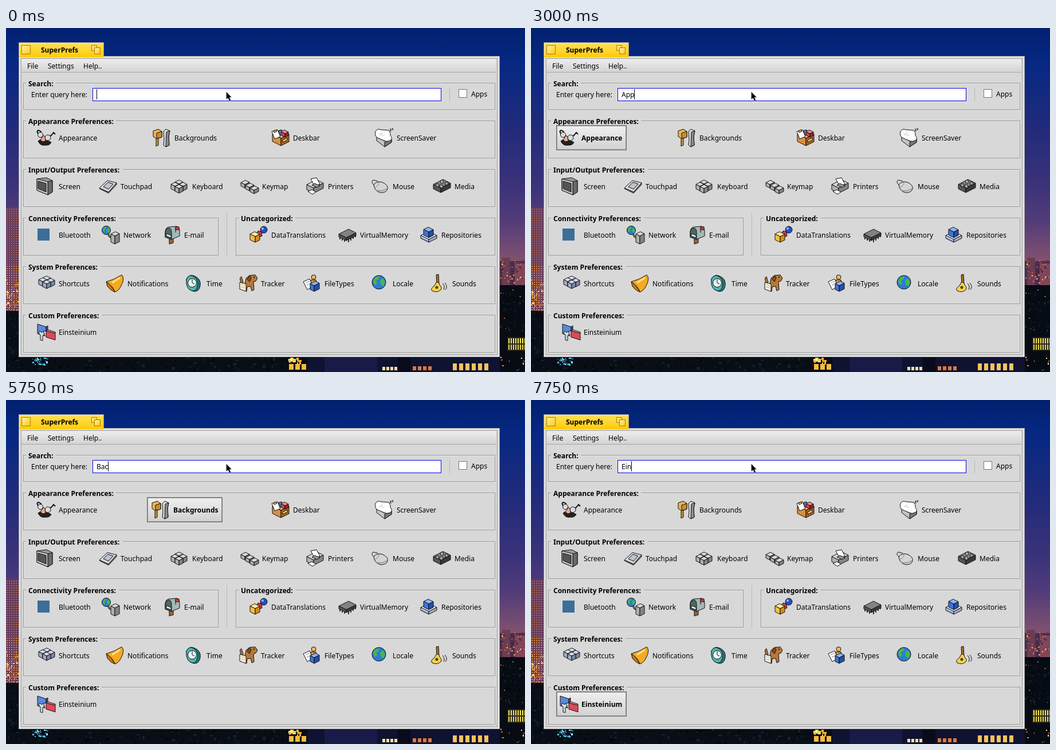
These frames come from a looping animation (906 by 602 pixels, 8000 ms). An HTML page:

```html
<!DOCTYPE html>
<html lang="en">
<head>
<meta charset="utf-8">
<title>SuperPrefs</title>
<style>
  html, body { margin: 0; width: 100%; height: 100%; overflow: hidden; background: #021f70; }
  svg { display: block; width: 100vw; height: 100vh; }
  text { font: 12px "Noto Sans", sans-serif; fill: #000; white-space: pre; }
  .bold { font-weight: bold; }
  rect, .crisp { shape-rendering: crispEdges; }
</style>
</head>
<body>
<svg viewBox="0 0 906 602">
  <defs>
    <linearGradient id="sky" x2="0" y2="1">
      <stop offset="0" stop-color="#02206f"/><stop offset=".1" stop-color="#062883"/>
      <stop offset=".3" stop-color="#232b7a"/><stop offset=".45" stop-color="#3a327a"/>
      <stop offset=".56" stop-color="#523c7a"/><stop offset=".67" stop-color="#80506f"/>
    </linearGradient>
    <linearGradient id="gold" x2="0" y2="1">
      <stop offset="0" stop-color="#ffe05a"/><stop offset="1" stop-color="#ffcb08"/>
    </linearGradient>
    <linearGradient id="goldBox" x2="1" y2="1">
      <stop offset="0" stop-color="#fff3a8"/><stop offset="1" stop-color="#ffc61a"/>
    </linearGradient>
    <linearGradient id="menu" x2="0" y2="1">
      <stop offset="0" stop-color="#ededed"/><stop offset="1" stop-color="#d2d2d2"/>
    </linearGradient>
    <linearGradient id="button" x2="0" y2="1">
      <stop offset="0" stop-color="#f0f0f0"/><stop offset="1" stop-color="#d0d0d0"/>
    </linearGradient>
  </defs>
  <g id="static"></g>
  <g id="items"></g>
  <g id="live"></g>
</svg>
<script>
const $ = id => document.getElementById(id);
const rect = (x, y, w, h, fill, stroke) => stroke
  ? `<rect x="${x + .5}" y="${y + .5}" width="${w - 1}" height="${h - 1}" fill="${fill}" stroke="${stroke}"/>`
  : `<rect x="${x}" y="${y}" width="${w}" height="${h}" fill="${fill}"/>`;
const text = (x, y, s, bold) => `<text x="${x}" y="${y}"${bold ? ' class="bold"' : ''}>${s}</text>`;
const path = (fill, d, extra = '') => `<path fill="${fill}" d="${d}" ${extra}/>`;
const line = (d, color = '#111', width = 1) => path('none', d, `style="stroke:${color};stroke-width:${width}"`);
const ball = (x, y, r, fill) => `<circle cx="${x}" cy="${y}" r="${r}" fill="${fill}"/>`;

// Isometric block; (x, y) is the front corner of its top face.
const block = (x, y, a, b, h, [top, left, right]) =>
  path(top, `M${x} ${y}l${-a} ${-a / 2} ${b} ${-b / 2} ${a} ${a / 2}z`) +
  path(left, `M${x} ${y}l${-a} ${-a / 2}v${h}l${a} ${a / 2}z`) +
  path(right, `M${x} ${y}l${b} ${-b / 2}v${h}l${-b} ${b / 2}z`);
const blocks = (spots, ...size) => spots.map(([x, y]) => block(x, y, ...size)).join('');

const GREY = ['#dadada', '#b0b0b0', '#858585'], PALE = ['#f2f4fa', '#d0d5e4', '#a5adc5'];
const DARK = ['#8a8a8a', '#555', '#3a3a3a'], BLUE = ['#8db4f5', '#3f74dc', '#2450a8'];
const YELLOW = ['#ffe9a0', '#f7bf3c', '#d48d18'], RED = ['#ff8c8c', '#e03c48', '#a8202c'];
const WOOD = ['#f2c07a', '#d98f3e', '#a86424'], STEEL = ['#d5dcea', '#a3adc4', '#7c88a6'];
const globe = (x, y, r) => ball(x, y, r, '#2f7ad8') +
  `<g transform="translate(${x} ${y}) scale(${r / 12})" stroke="none">` +
  path('#45b848', 'M-9-5q5-7 10-5l-2 5-4 2 2 4-3 4q-5-4-3-10zM3-5l5-1 3 6-3 7-4-2-2-5z') + '</g>';

const icons = {
  Appearance: line('M3 10Q-2 4 3 3l5 3M20 14l5-2 4-5 3 3', '#111', 2) + ball(6, 11, 4.5, '#d5dde0') +
    path('#222', 'M2 22q5-5 11-1 5-1 12 3-3 6-10 5-9 2-13-7z') + ball(19, 16, 5, '#d5dde0') +
    path('#f3a58c', 'M11 12l3 2 1 8-5 1-4-3z'),
  Backgrounds: path('#e8b456', 'M1 4l9-3 6 4v10l-9 3-6-4z') + path('#c98d38', 'M7 8l9-3v10l-9 3z') +
    path('#c98d38', 'M6 18l4-2v13l-4 2z') + path('#dcdcdc', 'M19 5l4-4 7 3-2 10 1 15-6 3-4-3 1-10z') +
    path('#8c8c8c', 'M24 6l6-2-2 10 1 15-6 3z'),
  Deskbar: block(17, 17, 15, 14, 13, WOOD) + path('#fff', 'M1 5l10-3 5 12-10 4z') +
    path('#f0b73a', 'M4 4l5-2 1 3-5 2z') + path('#5b8ae0', 'M13 4l5-2 2 8-5 2z') +
    block(24, 9, 7, 6, 6, RED) + path('#f5cf70', 'M20 20l8-4v4l-8 4z'),
  ScreenSaver: path('#c4c4c4', 'M3 14l14 8 12-4v6l-12 8-14-11z') + path('#777', 'M17 24l12-6v6l-12 8z') +
    path('#fff', 'M1 5q4-6 9-3l14 1q4 4 3 9 4 5 1 8-6 4-12 1L4 16Q-1 12 1 5z') +
    line('M7 8l2 4 3-5 1 6 4-3', '#ccc') + line('M26 1h3l-3 3h3M30 0h2l-2 2h2'),
  Screen: path('#9a9a9a', 'M0 3l17-2 10 5v20l-8 5-19-8z') + path('#6a6a6a', 'M19 8l8-2v20l-8 5z') +
    path('#c8c8c8', 'M0 3l19 5v23L0 23z') + path('#555', 'M2 7l14 4v15L2 20z'),
  Touchpad: path('#777', 'M1 20l16 8 14-15v-3z') + path('#d8d8d8', 'M1 19L15 6l16 4-14 16z') +
    path('#bac4d0', 'M8 17l8-8 9 3-8 9z'),
  Keyboard: blocks([[15, 12], [8, 16], [22, 16], [15, 20]], 7, 7, 8, GREY),
  Keymap: blocks([[8, 13], [16, 18], [24, 23]], 7, 8, 6, GREY),
  Printers: block(13, 19, 12, 17, 9, GREY) + path('#fff', 'M8 3l10-2 6 11-9 4z') +
    path('#999', 'M10 14l9 4 5-3-9-4z') + path('#fff', 'M3 25l7-3 7 4-6 4z'),
  Mouse: line('M6 14Q-1 9 4 5l8 2') + path('#d5d5d5', 'M5 13q6-7 15-4 11 5 9 12-3 7-13 6Q6 24 5 13z') +
    line('M14 9q0 7-8 9', '#888') + line('M8 22q9 5 20-2', '#999', 2),
  Media: block(14, 19, 13, 17, 8, DARK) + ball(8, 14, 3, '#999') + ball(15, 16, 3, '#aaa') +
    ball(16, 8, 3, '#aaa') + ball(24, 11, 3, '#999'),
  Bluetooth: `<rect x="1" y="5" width="21" height="21" fill="#3c6e98" stroke="none"/>`,
  Network: line('M11 13q2 9 9 7', '#111', 3) + line('M11 13q2 9 9 7', '#e6d36a') + globe(8, 8, 7.5) +
    block(23, 18, 7, 8, 14, GREY),
  'E-mail': path('#9a6432', 'M12 22l7-2v10l-7 2z') + path('#a4b8b6', 'M5 10q1-8 8-8l12-1q5 2 5 8v9l-14 6-11-4z') +
    path('#4e6664', 'M5 11q1-7 6-7t5 8v12L5 20z') + path('#fff', 'M7 14l8 3v4l-8-3z') +
    line('M23 12V3') + path('#e03c38', 'M23 2h6v5h-6z'),
  DataTranslations: line('M11 18l13-10', '#111', 3) + path('#d83840', 'M15 9l6 2 1 7-6 2-4-5z') +
    ball(25, 7, 6, '#2050c4') + `<circle cx="23" cy="5" r="2" fill="#9bbcff" stroke="none"/>` +
    block(10, 19, 9, 8, 10, YELLOW),
  VirtualMemory: line('M3 18v6M7 20v6M11 22v6M18 23v6M22 20v6M26 17v6M30 14v6', '#333', 2) +
    block(14, 21, 13, 17, 5, ['#828282', '#555', '#3c3c3c']),
  Repositories: block(16, 24, 14, 14, 5, PALE) + block(16, 11, 9, 8, 10, BLUE) + line('M3 21l12 6', '#3f74dc'),
  Shortcuts: blocks([[17, 10], [10, 13], [24, 14], [17, 17]], 7, 7, 8, STEEL),
  Notifications: path('#f4aa22', 'M1 13q13-3 27-12 6 6-1 19-4 9-11 11-3-10-15-18z') +
    path('#c97a10', 'M1 13q10 7 15 18-7-2-13-10z') + line('M11 15l14-9', '#ffe08a', 3),
  Time: path('#267878', 'M3 8q5-9 14-5 12 5 10 17-2 11-11 10Q2 27 3 8z') +
    path('#50b4b4', 'M3 8q5-9 13-4 9 6 6 17-2 9-9 8Q1 26 3 8z') + ball(13, 15, 7.5, '#e8f4f0') + line('M13 9v6l4 2'),
  Tracker: path('#b87838', 'M12 7l6-5 10-1 4 6-3 5-4 1 1 14-4 2-2-8-6 1-1 8-5-2z') +
    path('#8a5020', 'M18 2l-4 7 4 4 3-7z') + ball(26, 5, .7, '#111') +
    path('#b87838', 'M4 16q-5-10 0-12l3 10z') + path('#f8f4dc', 'M1 14l11 3v13L1 26z') + line('M3 18l7 2M3 22l7 2', '#aaa'),
  FileTypes: path('#fff', 'M1 13l11-5 6 13-10 6z') + line('M5 15l7-3M7 19l7-3', '#888') + ball(19, 5, 4, '#f3b65a') +
    path('#d9a040', 'M14 10h9l3 10-11 2z') + block(20, 20, 7, 9, 10, BLUE),
  Locale: globe(14, 14, 12),
  Sounds: path('#b06c22', 'M10 1l4-1 1 17h-4z') + path('#f3d34c', 'M10 14q5-1 6 5 5 4 2 8-6 6-15 2-4-4 4-9z') +
    ball(11, 23, 2, '#755018') + line('M21 16q5 5 2 11M25 15q6 7 1 12'),
  Einsteinium: path('#5c88dc', 'M1 2l15 5v7l-5 1 3 8-13-4z') + path('#2d57a8', 'M16 7l3-2v7l-3 2z') +
    path('#d4dbe2', 'M5 14l3 3 3-2 2 4-3 4v8l-4-1v-9l-3-3z') + path('#dd4a56', 'M16 14l16 4v12l-16-5z') +
    path('#f2a0a6', 'M16 14l3-2 13 4v2z')
};

// [x, y, width, height, title, end of the gap in the top line, [[label, x]...]]
const groups = [
  [30, 96, 824, 47, 'Search:', 87, []],
  [30, 162, 824, 66, 'Appearance Preferences:', 192,
    [['Appearance', 92], ['Backgrounds', 294], ['Deskbar', 501], ['ScreenSaver', 682]]],
  [30, 247, 824, 66, 'Input/Output Preferences:', 204,
    [['Screen', 92], ['Touchpad', 200], ['Keyboard', 325], ['Keymap', 447], ['Printers', 562], ['Mouse', 675], ['Media', 783]]],
  [30, 332, 341, 66, 'Connectivity Preferences:', 197,
    [['Bluetooth', 92], ['Network', 205], ['E-mail', 311]]],
  [401, 332, 453, 66, 'Uncategorized:', 505,
    [['DataTranslations', 463], ['VirtualMemory', 618], ['Repositories', 760]]],
  [30, 417, 824, 66, 'System Preferences:', 165,
    [['Shortcuts', 92], ['Notifications', 212], ['Time', 350], ['Tracker', 445], ['FileTypes', 556], ['Locale', 675], ['Sounds', 779]]],
  [30, 502, 824, 66, 'Custom Preferences:', 167, [['Einsteinium', 92]]]
];

let seed = 11;
const random = () => (seed = seed * 16807 % 2147483647) / 2147483647;
const lights = (x, y, w, h, count, colors, size = 3) => Array.from({ length: count }, () =>
  rect(Math.floor(x + random() * w), Math.floor(y + random() * h), 1 + Math.floor(random() * size),
    1 + Math.floor(random() * size), colors[Math.floor(random() * colors.length)])).join('');
const windows = (x, y, count, gap, w, h, color) => Array.from({ length: count }, (_, i) =>
  rect(x + i * gap, y, w, h, color)).join('');

function city() {
  const warm = ['#ffb648', '#e88a3c', '#ffe08a', '#b85c3c'];
  const trees = ['#04070c', '#0c151c', '#12222a', '#080f16'];
  const floors = Array.from({ length: 45 }, (_, i) =>
    windows(1, 316 + i * 4, 6, 4, 2, 2, i < 25 ? '#a8675c' : '#d98a48')).join('');
  return rect(0, 0, 906, 602, 'url(#sky)') +
    rect(0, 313, 22, 182, '#64395a') + floors + lights(0, 440, 22, 55, 60, warm) +
    rect(0, 495, 23, 107, '#080d16') + lights(0, 495, 23, 90, 60, trees, 5) +
    rect(862, 408, 44, 50, '#4c2c4c') + rect(866, 402, 14, 50, '#6b3d52') + rect(888, 412, 18, 40, '#80465a') +
    lights(862, 405, 44, 45, 60, ['#c96c50', '#8a4858', '#3a2440', '#f0a060']) +
    rect(862, 450, 44, 152, '#070b13') + lights(862, 450, 44, 80, 70, trees, 5) +
    lights(862, 455, 44, 75, 10, warm, 2) + rect(875, 541, 31, 24, '#2c2a18') +
    windows(877, 543, 8, 4, 2, 9, '#f3e45c') + windows(877, 554, 8, 4, 2, 9, '#e4d050') +
    rect(0, 576, 862, 26, '#080d16') + lights(0, 576, 490, 26, 200, trees, 6) +
    lights(45, 577, 27, 13, 36, ['#48b8dc', '#8fe4f4', '#2874a8'], 3) +
    rect(526, 576, 336, 26, '#0f1230') + rect(556, 576, 92, 26, '#181b48') + rect(684, 576, 22, 26, '#090b1c') +
    lights(490, 577, 34, 10, 14, ['#f8d448', '#ffae34', '#fff0a0'], 6) + windows(494, 588, 3, 11, 8, 10, '#f5bc3c') +
    windows(657, 593, 4, 7, 5, 6, '#ffe0a0') + windows(710, 592, 4, 9, 6, 7, '#e07838') +
    windows(780, 587, 6, 11, 7, 12, '#f7c45c') + lights(862, 575, 44, 27, 10, warm);
}

function frame() {
  return rect(22, 25, 149, 27, 'url(#gold)', '#989898') + rect(23, 26, 147, 1, '#fff0a8') + rect(23, 26, 1, 25, '#fff0a8') +
    rect(27, 30, 16, 16, 'url(#goldBox)', '#ad7d00') + rect(149, 30, 10, 10, 'url(#goldBox)', '#ad7d00') +
    rect(154, 34, 11, 12, 'url(#goldBox)', '#ad7d00') + text(61, 43, 'SuperPrefs', true) +
    rect(22, 49, 840, 527, '#d8d8d8', '#989898') + rect(23, 50, 838, 525, 'none', '#f4f4f4') +
    rect(26, 53, 832, 519, 'none', '#a4a4a4') + rect(23, 49, 147, 2, '#ffcb08') +
    rect(27, 54, 829, 24, 'url(#menu)') + rect(27, 77, 829, 1, '#a8a8a8') +
    text(37, 71, 'File') + text(73, 71, 'Settings') + text(135, 71, 'Help..');
}

const groupBox = ([x, y, w, h, title, gapEnd]) =>
  rect(x + 1, y + 1, w - 2, h - 2, 'none', '#e4e4e4') + rect(x, y, w, h, 'none', '#989898') +
  rect(x + 5, y, gapEnd - x - 5, 2, '#d8d8d8') + text(x + 9, y + 6, title, true);

const dots = (x, y1, y2) => `<path class="crisp" d="M${x}.5 ${y1}V${y2}" stroke="#989898" stroke-dasharray="1 1"/>`;

$('static').innerHTML = city() + frame() + groups.map(groupBox).join('') +
  text(44, 121, 'Enter query here:') + rect(151, 105, 609, 23, '#fff', '#0000e5') +
  dots(774, 105, 128) + dots(385, 325, 400) +
  rect(790, 107, 15, 15, '#fff', '#777') + text(812, 120, 'Apps');

const pen = document.createElement('canvas').getContext('2d');
const textWidth = (s, weight = 'normal') => {
  pen.font = `${weight} 12px "Noto Sans", sans-serif`;
  return pen.measureText(s).width;
};

function item(label, x, y, active) {
  let shift = 0, back = '';
  if (active) {
    const width = textWidth(label, 'bold'), left = x - 48;
    shift = x < 100 ? -4 : Math.round((textWidth(label) - width) / 2);
    const right = Math.round(x + shift + width + 8);
    back = rect(left, y + 8, right - left, 44, 'url(#button)', '#707070') +
      rect(left + 1, y + 9, right - left - 2, 42, 'none', '#989898');
  }
  return back + `<g transform="translate(${x + shift - 38} ${y + 14})" stroke="#111">${icons[label]}</g>` +
    text(x + shift, y + 35, label, active);
}

const pointers = {
  hand: path('#fff', 'M1 2q2-2 5 0l4 2q5-1 7 4v6l-5 2H7l-3-3 3-1-1-4-4-2z', 'stroke="#111"') + line('M9 5l2 3M12 5l2 3', '#777'),
  beam: line('M1 .5h2l1 1 1-1h2M4 1v16M1 17.5h2l1-1 1 1h2')
};
const arrow = path('#000', 'M384.5 111.5v13.5l3-2.500 2.500 5 2.500-1.500-2.500-4.500h4z', 'stroke="#ddd" stroke-width=".5"');

// [start in ms, query, caret shown, pointer, x, y]
const steps = [
  [0, '', 1], [250, '', 0], [500, '', 1],
  [750, '', 1, 'hand', 366, 48], [1000, '', 0, 'hand', 349, 149],
  [1250, '', 0, 'hand', 335, 133], [1500, '', 0, 'hand', 332, 130],
  [1750, '', 0, 'beam', 318, 112], [2000, '', 1, 'beam', 315, 108],
  [2500, 'A', 1], [2750, 'Ap', 1], [3000, 'App', 1], [3250, 'Appe', 1], [3500, 'Appea', 1], [3750, 'Appe', 1],
  [4250, '', 1], [4750, 'Ba', 1], [5000, 'Back', 1], [5750, 'Bac', 1],
  [6250, '', 1], [6750, 'E', 1], [7000, 'Ein', 1], [7250, 'Eins', 1], [7750, 'Ein', 1]
];

function show([, query, caret, pointer, x, y]) {
  const matches = label => query.length > 1 && label.toLowerCase().includes(query.toLowerCase());
  $('items').innerHTML = groups.flatMap(([, top, , , , , labels]) =>
    labels.map(([label, left]) => item(label, left, top, matches(label)))).join('');
  $('live').innerHTML = text(158, 121, query) +
    (caret ? rect(Math.round(158 + textWidth(query)), 107, 1, 18, '#000') : '') + arrow +
    (pointer ? `<g transform="translate(${x} ${y})">${pointers[pointer]}</g>` : '');
}

const start = performance.now();
let current;
function tick() {
  const time = (performance.now() - start) % 8000;
  const step = steps.findLast(([from]) => from <= time);
  if (step !== current) show(current = step);
  requestAnimationFrame(tick);
}
tick();
</script>
</body>
</html>
```
